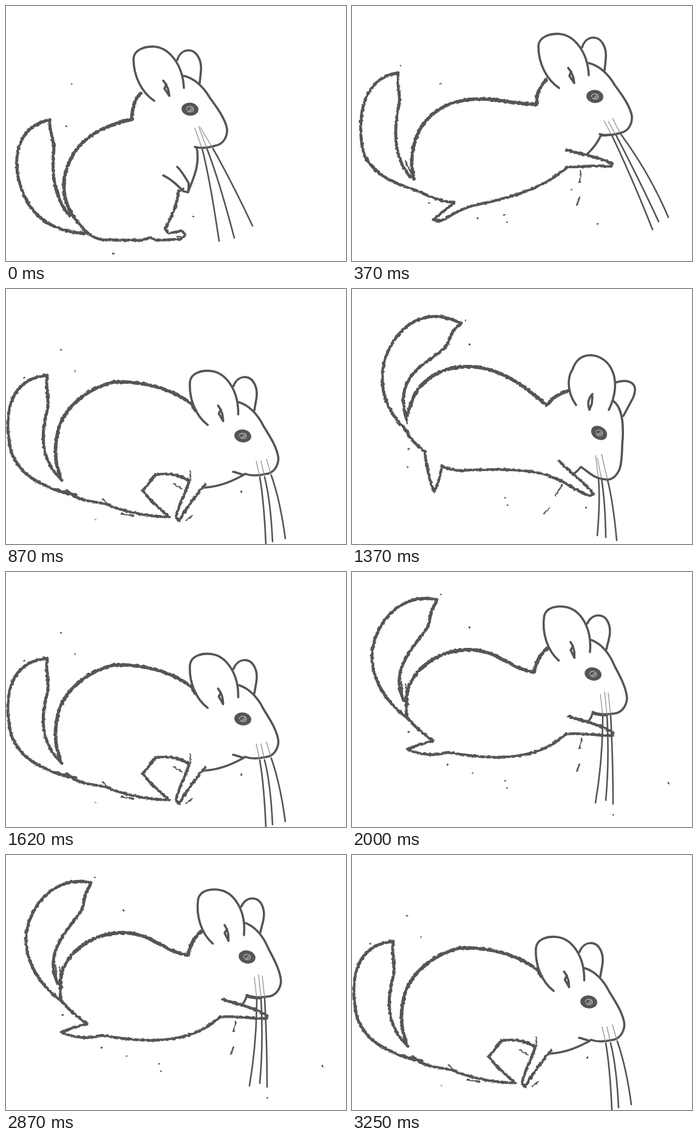
Write an HTML page that moves like this. It is 560x420 px and loops after 3.37 s.

```html
<!DOCTYPE html>
<html lang="en">
<head>
<meta charset="utf-8">
<title>Running chinchilla</title>
<style>
  html, body { margin: 0; width: 100%; height: 100%; overflow: hidden; background: #fff; }
  svg { display: block; width: 560px; height: 420px; }
  path { fill: none; stroke: #555; stroke-linecap: round; stroke-linejoin: round; }
  #back { stroke-width: 5.8; }
  #tail { stroke-width: 5; }
  #under { stroke-width: 4.6; }
  #chest, #skull { stroke-width: 3.6; }
  #marks { stroke-width: 2.4; }
  #whiskers { stroke-width: 2.6; }
  #roots { stroke-width: 1.2; stroke: #888; }
  #glint { stroke-width: 1.1; stroke: #bbb; }
</style>
</head>
<body>
<svg viewBox="0 0 560 420">
  <filter id="rough" filterUnits="userSpaceOnUse" x="0" y="0" width="560" height="420" color-interpolation-filters="sRGB">
    <feTurbulence type="fractalNoise" baseFrequency=".2" numOctaves="2" seed="4"/>
    <feDisplacementMap in="SourceGraphic" scale="4" xChannelSelector="R" yChannelSelector="G"/>
  </filter>
  <g filter="url(#rough)">
    <path id="back"/><path id="tail"/><path id="under"/><path id="marks"/>
  </g>
  <path id="chest"/>
  <g id="head">
    <path id="skull"/>
    <g id="eye">
      <ellipse rx="14" ry="10.7" fill="#555"/>
      <path id="glint" d="M-6 1C-5-6 5-6 6 0C6 5-3 6-4 2M-1 3L3-3M1 3L5-1"/>
    </g>
  </g>
  <path id="roots"/><path id="whiskers"/>
</svg>
<script>
const skull =
  'M-59,-14 C-80,-28 -93,-55 -93,-83 C-92,-98 -75,-104 -58,-103 C-35,-101 -12,-75 -10,-35' +
  'M-21,-81 C-17,-94 -8,-97 -2,-97 C10,-97 20,-82 18,-62 L16,-43' +
  'M-44,-47 C-36,-38 -35,-30 -34,-22 L-42,-34 L-39,-41' +
  'M-10,-55 C7,-51 22,-37 32,-20 C40,-8 57,12 61,32 C62,45 55,58 42,60 C32,63 18,65 8,62';

const sit = {
  head: 'translate(303,170) rotate(0)', eye: 'rotate(6)', skull,
  back: 'M222,144 C210,155 208,170 207,187 C165,196 125,213 105,255 C88,290 95,325 112,348',
  tail: 'M136,375 C95,374 60,360 40,330 C20,300 12,260 22,230 C30,205 48,193 72,187 C70,205 82,225 78,245 C75,290 85,325 105,345',
  under: 'M112,348 C130,372 142,383 160,385 L225,386 238,381 246,386 285,384 C296,383 298,372 288,371 C280,371 274,374 268,375 L262,367 C272,348 282,330 284,305',
  chest: 'M314,233 C320,262 308,285 300,306 M259,279 C272,285 282,295 292,305 L300,307 301,292 C296,284 290,272 282,265 M284,306L292,301',
  roots: 'M311,201L323,235 M317,198L331,235 M320,200L341,235',
  whiskers: 'M323,235Q335,280 351,387 M331,235Q352,290 376,382 M341,235Q372,290 406,362',
  marks: 'M108,129h.5 M99,198h1 M307,346h1 M176,408h2 M85,300L91,327 M88,318L102,343 M282,380h6'
};

const crouch = {
  head: 'translate(390,242) rotate(4)', eye: 'rotate(4)', skull,
  back: 'M312,200 C310,197 308,193 306,190 C275,165 230,152 178,153 C130,165 100,195 88,225 C78,260 80,285 90,310',
  tail: 'M115,340 C70,330 20,310 8,265 C1,235 -10,150 68,142 C64,160 72,180 68,200 C55,245 60,285 92,315',
  under: 'M100,332 C118,350 145,350 165,354 C200,370 240,374 270,376 C250,360 235,345 225,332 C235,322 240,312 246,306 C270,303 285,306 302,316 C296,335 284,355 280,376 L285,381 C298,360 312,340 328,322',
  chest: 'M328,327 C355,325 375,315 392,306 C385,305 380,302 374,301',
  roots: 'M412,283L418,310 M420,283L426,310 M429,280L437,307',
  whiskers: 'M418,310Q425,350 428,420 M426,310Q436,350 439,416 M437,307Q452,350 460,411',
  marks: 'M303,299L304,315 M190,370L210,374 M297,381L306,374 M276,321L290,329 M90,100h.3 M113,135h1 M30,146h.5 M387,334h1 M147,380h.5 M160,346l6,8'
};

const leap = {
  head: 'translate(400,149) rotate(0)', eye: 'rotate(6)', skull,
  back: 'M320,122 C307,135 303,150 304,162 C255,162 235,148 185,155 C130,165 105,200 99,245 C98,260 98,270 102,285',
  tail: 'M115,307 C80,295 40,285 20,245 C8,200 10,120 76,110 C73,125 80,145 78,160 C70,195 65,245 96,282',
  under: 'M112,306 C130,316 150,322 168,324 C158,333 140,345 135,352 C145,356 150,352 156,349 C170,340 185,333 198,329 C250,318 310,305 355,265 C380,265 400,262 427,264 L429,260 C405,248 380,245 353,237',
  chest: 'M387,244 C396,236 404,226 410,213 C415,214 420,212 425,212',
  roots: 'M415,189L428,213 M422,190L435,213 M429,185L442,210',
  whiskers: 'M428,213Q460,280 495,368 M435,213Q475,290 505,355 M442,210Q490,275 521,348',
  marks: 'M377,272L375,290 M375,315L370,328 M145,128h1 M80,98h.3 M206,349h1 M250,344h1 M255,356h.5 M404,359h.5 M362,302h.5 M127,325h1 M82,258L92,277 M88,256L98,277'
};

const glide = {
  head: 'translate(397,168) rotate(8)', eye: 'rotate(4)', skull,
  back: 'M321,126 C308,138 303,150 300,165 C260,160 240,127 190,128 C135,130 95,165 90,205 C88,215 90,225 90,235',
  tail: 'M92,241 C70,225 38,195 33,145 C30,95 75,30 141,46 C125,70 130,80 124,92 C100,125 60,165 86,212',
  under: 'M90,238 C100,252 115,265 134,278 C120,282 100,287 91,292 C105,298 120,301 135,301 C145,300 152,298 158,297 C220,308 300,316 352,267 C375,264 400,270 430,269 L430,264 C405,250 380,245 357,238',
  chest: 'M388,248 C392,243 395,238 396,233 C405,236 412,236 420,236',
  roots: 'M409,201L413,236 M416,197L420,236 M422,199L426,236',
  whiskers: 'M413,236Q413,310 401,380 M420,236Q424,310 418,376 M426,236Q430,310 430,382',
  marks: 'M378,275L375,290 M375,316L370,328 M193,91h1 M146,37h.5 M198,331h1 M157,317h1 M251,344h1 M255,356h.5 M430,400h.5 M521,348h.5 M93,263h1 M82,182L83,205 M88,185L93,220'
};

const land = {
  head: 'translate(407,237) rotate(0)', eye: 'rotate(32)',
  skull:
    'M-38,-46 C-56,-72 -50,-95 -44,-104 C-38,-122 -26,-128 -14,-128 C21,-126 39,-85 16,-38' +
    'M27,-83 C36,-86 45,-86 50,-84 C62,-80 60,-68 56,-58 L40,-28' +
    'M-11,-64 C-17,-57 -20,-50 -16,-38 L-12,-48 L-11,-60' +
    'M23,-53 C38,-42 40,-17 39,8 C37,23 39,43 34,59 C29,71 21,77 13,77 C5,76 -2,75 -9,71',
  back: 'M355,168 C340,173 328,180 321,192 C285,160 240,125 185,128 C135,130 105,160 97,190 C94,197 92,202 91,208',
  tail: 'M92,236 C73,216 49,190 50,145 C49,95 100,15 180,57 C160,70 162,85 154,96 C130,120 65,140 90,215',
  under: 'M88,233 C98,250 108,258 120,268 C122,290 128,320 136,334 C142,320 146,305 148,291 C155,295 165,298 175,299 C240,296 300,295 335,312 C350,317 368,332 391,341 L398,338 C385,318 355,300 341,283',
  chest: 'M366,304 C370,301 373,298 377,293 C383,297 390,303 398,308',
  roots: 'M401,274L406,312 M404,278L411,313 M411,272L421,315',
  whiskers: 'M406,312Q409,350 404,406 M411,313Q417,350 418,409 M421,315Q430,350 436,414',
  marks: 'M316,370L325,361 M335,340L346,323 M193,91h1 M251,344h1 M256,356h.5 M385,360h1 M92,294h.5 M187,51h.5 M93,263h1 M85,195L91,222'
};

// Halfway pose: average every number of two strings of the same form.
const number = /-?\d+/g;
function between(a, b) {
  const pose = {};
  for (const part in a) {
    const other = b[part].match(number);
    let i = 0;
    pose[part] = part === 'marks' ? a.marks
      : a[part].replace(number, n => (+n + +other[i++]) / 2);
  }
  return pose;
}

const stride = [crouch, between(crouch, leap), leap, glide, land, between(land, crouch)];

function show(pose) {
  for (const part in pose) {
    const attribute = /head|eye/.test(part) ? 'transform' : 'd';
    document.getElementById(part).setAttribute(attribute, pose[part]);
  }
}

const LOOP = 3370;
let current;
function frame(now) {
  // Eight drawings a second on a 10 ms grid; the sit and the third glide are held twice.
  const tick = Math.floor((Math.floor(now % LOOP / 10) + .5) / 12.5);
  const step = tick - (tick > 0) - (tick > 16);
  const pose = step ? stride[step % 6] : sit;
  if (pose !== current) show(current = pose);
  requestAnimationFrame(frame);
}
frame(0);
</script>
</body>
</html>
```
